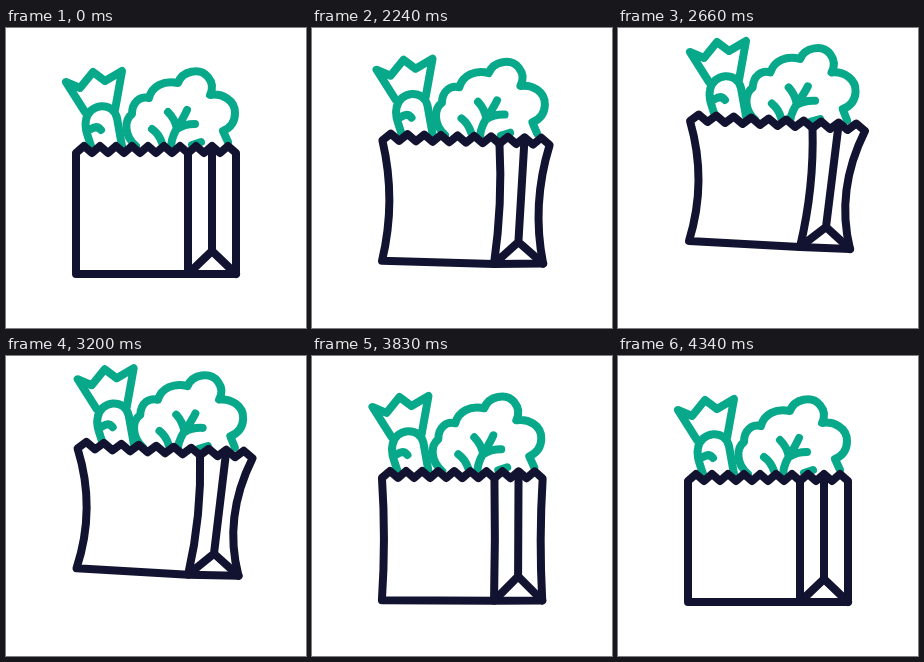
These frames come from a looping animation (300 by 300 pixels, 4.37 s). An HTML page with a canvas:

```html
<!DOCTYPE html>
<html lang="en">
<head>
<meta charset="utf-8">
<title>Grocery bag</title>
<style>
html, body { margin: 0; width: 100%; height: 100%; overflow: hidden; background: #fff; }
canvas { display: block; width: 300px; height: 300px; }
</style>
</head>
<body>
<canvas id="stage" width="300" height="300"></canvas>
<script>
const ctx = document.getElementById('stage').getContext('2d');
const LOOP = 4370, START = 2030, STEP = 30;
const INK = '#121331', GREEN = '#08a88a';

const carrot = new Path2D(
  'M79 84 L60 54 L74 60 L87 44 L99 53 L116 43 L109 82 ' +
  'M85 118 C82 108 78 100 80 92 C83 75 107 73 111 90 L116 118 ' +
  'M85 101 Q91 97 95 102');
const broccoli = new Path2D(
  'M130 118 C118 108 118 92 126 86 C126 74 134 68 143 70 ' +
  'C146 58 158 52 172 55 C176 43 194 39 202 49 C207 55 207 61 204 67 ' +
  'C216 65 229 72 229 85 C229 95 224 100 217 103 L222 114 ' +
  'M146 101 Q153 106 156 115 M165 118 C166 104 174 98 181 82 ' +
  'M162 84 Q169 91 171 101 M171 101 Q178 96 189 96 M186 117 L195 114');

// Corners are points; bend holds sideways bulges of the left, inner and right edges.
// Vegetables: x shift, y shift, rotation, vertical scale.
const rest = {
  tl: [70, 125], tr: [230, 125], bl: [70, 246], bm: [182, 246], br: [230, 246],
  apex: [206, 223], bend: [0, 0, 0], carrot: [0, 0, 0, 1], broccoli: [0, 0, 0, 1]
};
const lifted = {
  tl: [71, 99], tr: [245, 108], bl: [70, 219], bm: [182, 225], br: [232, 225],
  apex: [207, 204], bend: [9, 4, -10], carrot: [9.5, -25, 0, 1], broccoli: [6, -20, 0.05, 1]
};
const hover = {
  tl: [72, 93], tr: [247, 103], bl: [71, 213], bm: [182, 219], br: [232, 221],
  apex: [208, 199], bend: [9, 4, -11], carrot: [12, -30, 0, 1], broccoli: [7, -24, 0.05, 1]
};
const peak = {
  tl: [69, 89], tr: [244, 98], bl: [68, 208], bm: [183, 217], br: [235, 213],
  apex: [208, 190], bend: [13, 3, -12], carrot: [10, -35, 0, 1], broccoli: [5, -29, 0.03, 1]
};
const squash = {
  ...rest, tl: [66, 131], tr: [234, 131], bl: [65, 246], bm: [183, 246], br: [236, 246],
  apex: [208, 227], bend: [-10.5, -9.5, 8], carrot: [0, 6, 0.1, 1], broccoli: [4, 6, 0.02, 0.8]
};
const keys = [
  [2000, rest],
  [2030, { ...rest, bend: [2, 0.5, -2] }],
  [2420, lifted],
  [2660, hover],
  [3080, hover],
  [3560, peak],
  [3630, peak],
  [3860, rest],
  [4010, squash],
  [4160, { ...rest, bend: [1.5, 0.5, -1.5] }],
  [4340, rest]
];

// Monotone cubic interpolation: smooth through the keys, without overshoot.
function sample(get, i, t) {
  const time = k => keys[k][0], value = k => get(keys[k][1]);
  const slope = k => (value(k + 1) - value(k)) / (time(k + 1) - time(k));
  const tangent = k => {
    if (k === 0 || k === keys.length - 1) return 0;
    const a = slope(k - 1), b = slope(k);
    return a * b > 0 ? 2 * a * b / (a + b) : 0;
  };
  const h = time(i + 1) - time(i), u = (t - time(i)) / h;
  const u2 = u * u, u3 = u2 * u;
  return (2 * u3 - 3 * u2 + 1) * value(i) + (u3 - 2 * u2 + u) * h * tangent(i) +
    (3 * u2 - 2 * u3) * value(i + 1) + (u3 - u2) * h * tangent(i + 1);
}

function poseAt(ms) {
  if (ms < START) return rest;
  const t = START + Math.floor((ms - START) / STEP) * STEP;
  let i = 0;
  while (i < keys.length - 2 && t >= keys[i + 1][0]) i++;
  const pose = {};
  for (const name in rest)
    pose[name] = rest[name].map((_, n) => sample(p => p[name][n], i, t));
  return pose;
}

function drawVegetable(path, pivotX, [dx, dy, angle, scaleY]) {
  ctx.save();
  ctx.translate(pivotX + dx, 118 + dy);
  ctx.rotate(angle);
  ctx.scale(1, scaleY);
  ctx.translate(-pivotX, -118);
  ctx.stroke(path);
  ctx.restore();
}

function curveTo([ax, ay], [bx, by], bulge) {
  ctx.quadraticCurveTo((ax + bx) / 2 + 2 * bulge, (ay + by) / 2, bx, by);
}

function drawBag(p) {
  const rim = (f, lift = 0) => [
    p.tl[0] + (p.tr[0] - p.tl[0]) * f,
    p.tl[1] + (p.tr[1] - p.tl[1]) * f - lift
  ];
  const [left, inner, right] = p.bend;

  ctx.beginPath();
  ctx.moveTo(...p.tl);
  for (let i = 1; i <= 20; i++) ctx.lineTo(...rim(i / 20, i % 2 ? 7 : 0));
  curveTo(p.tr, p.br, right);
  ctx.lineTo(...p.bm);
  ctx.lineTo(...p.bl);
  curveTo(p.bl, p.tl, left);
  ctx.closePath();
  ctx.fill();
  ctx.stroke();

  const fold = rim(0.7);
  ctx.beginPath();
  ctx.moveTo(...fold);
  curveTo(fold, p.bm, inner);
  ctx.lineTo(...p.apex);
  ctx.lineTo(...p.br);
  ctx.moveTo(...rim(0.85, 6));
  ctx.lineTo(...p.apex);
  ctx.stroke();
}

function draw(ms) {
  const pose = poseAt(ms);
  ctx.fillStyle = '#fff';
  ctx.fillRect(0, 0, 300, 300);
  ctx.lineWidth = 8;
  ctx.lineCap = ctx.lineJoin = 'round';
  ctx.strokeStyle = GREEN;
  drawVegetable(broccoli, 175, pose.broccoli);
  drawVegetable(carrot, 100, pose.carrot);
  ctx.strokeStyle = INK;
  drawBag(pose);
}

const begin = performance.now();
function tick() {
  draw((performance.now() - begin) % LOOP);
  requestAnimationFrame(tick);
}
tick();
</script>
</body>
</html>
```
